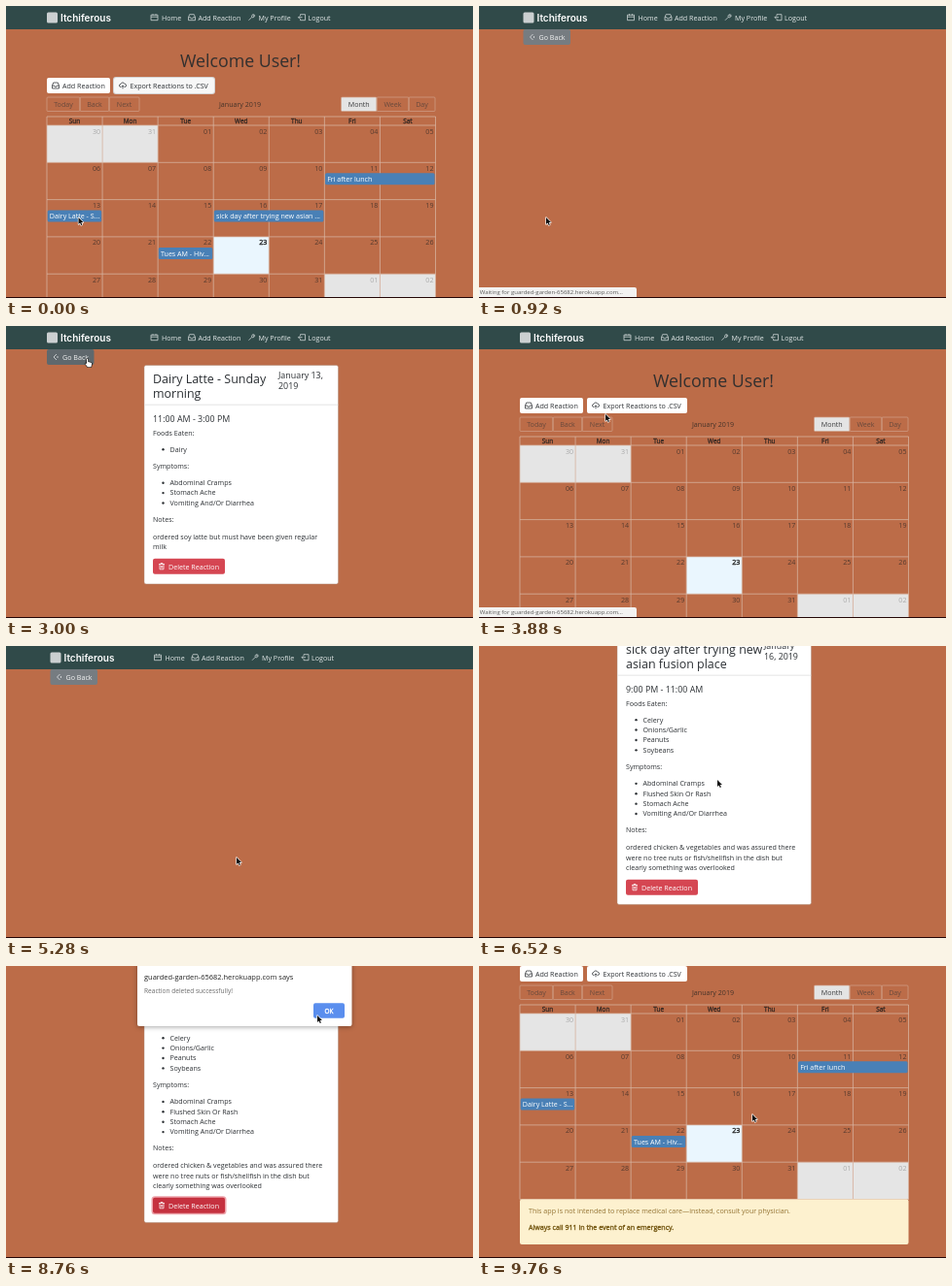
These frames come from a looping animation (480 px wide and 301 px high, 9.8 s). An HTML page with a canvas:

```html
<!DOCTYPE html>
<html lang="en">
<head>
<meta charset="utf-8">
<title>Reaction calendar</title>
<style>
html, body { margin: 0; width: 100%; height: 100%; overflow: hidden; background: #bc6c48; }
canvas { display: block; width: 480px; height: 301px; }
</style>
</head>
<body>
<canvas id="stage" width="480" height="301"></canvas>
<script>
const ctx = document.getElementById('stage').getContext('2d');
const LOOP = 9800, STEP = 40;
const BASE = 7.11, H1 = 17.77, H3 = 12.44, H5 = 8.88;
const HOST = 'guarded-garden-65682.herokuapp.com';
const PAGE = '#bc6c48', INK = '#2b2f33';

const icons = {
  calendar: 'M0 1h7v5.5h-7zM0 3h7M2 0v1.5M5 0v1.5',
  inbox: 'M0 3.5l1.2-3h4.6l1.2 3v3h-7zM0 3.5h2l.6 1.2h1.8l.6-1.2h2',
  tool: 'M.5 6.5l3.2-3.2M3.7 3.3a1.9 1.9 0 0 1 2.2-2.7l-1 1.1.5.6 1.2-1a1.9 1.9 0 0 1-2.9 2',
  logout: 'M2 2v-1.5h5v6h-5v-1.5M0 3.5h4M1.3 2.2l-1.3 1.3 1.3 1.3',
  cloud: 'M2 5h-.5a1.5 1.5 0 0 1 0-3a2 2 0 0 1 3.8-.3a1.6 1.6 0 0 1 .2 3.3h-.5M3.5 6.8v-3.3M2.4 4.5l1.1-1.1 1.1 1.1',
  back: 'M4 .5l-3 3 3 3M5.5 2.5l-1 1 1 1',
  trash: 'M0 1.2h6M1 1.2v5.3h4v-5.3M2 1.2v-1h2v1M2.3 2.7v2.5M3.7 2.7v2.5'
};
for (const name in icons) icons[name] = new Path2D(icons[name]);
const arrow = new Path2D('M0 0v7l1.6-1.4 1.1 2.4 1.2-.5-1.1-2.4h2.2z');
const hand = new Path2D('M1 0q1-.5 1.3.5v2.4l3.2.9q.8.3.6 1.2l-.6 3.2h-3.6l-2.4-3q-.3-1 .8-.7l.7.5z');

const events = [
  { row: 1, col: 5, span: 2, label: 'Fri after lunch' },
  { row: 2, col: 0, span: 1, label: 'Dairy Latte - S...' },
  { row: 2, col: 3, span: 2, label: 'sick day after trying new asian ...', removable: true },
  { row: 3, col: 2, span: 1, label: 'Tues AM - Hiv...' }
];

const latte = {
  title: ['Dairy Latte - Sunday', 'morning'],
  date: ['January 13,', '2019'], dateX: 280,
  time: '11:00 AM - 3:00 PM',
  foods: ['Dairy'],
  symptoms: ['Abdominal Cramps', 'Stomach Ache', 'Vomiting And/Or Diarrhea'],
  notes: ['ordered soy latte but must have been given regular', 'milk']
};
const fusion = {
  title: ['sick day after trying new', 'asian fusion place'],
  date: ['January', '16, 2019'], dateX: 293,
  time: '9:00 PM - 11:00 AM',
  foods: ['Celery', 'Onions/Garlic', 'Peanuts', 'Soybeans'],
  symptoms: ['Abdominal Cramps', 'Flushed Skin Or Rash', 'Stomach Ache', 'Vomiting And/Or Diarrhea'],
  notes: ['ordered chicken & vegetables and was assured there',
    'were no tree nuts or fish/shellfish in the dish but', 'clearly something was overlooked']
};

// Pointer stops: time, x, y
const pointerPath = [
  [0, 74.5, 218], [240, 74.5, 218], [600, 69, 218], [2320, 69, 218], [2800, 82, 34],
  [3480, 82, 34], [4560, 237, 218], [5720, 237, 218], [5920, 245, 138], [6800, 245, 138],
  [7200, 195, 246], [7840, 195, 246], [8240, 320, 51], [9400, 320, 51], [9720, 281, 153]
];

const within = (t, from, to) => t >= from && t < to;
const clamp = v => Math.max(0, Math.min(1, v));
const smooth = p => p * p * (3 - 2 * p);
const easeOut = p => 1 - (1 - p) ** 3;

// Text is placed by the vertical middle of its capitals.
function text(str, x, y, { size = BASE, color = INK, align = 'left', bold = false, font = '"Open Sans"', weight = 400 } = {}) {
  ctx.font = `${weight} ${size}px ${font}, sans-serif`;
  ctx.textAlign = align;
  ctx.fillStyle = ctx.strokeStyle = color;
  ctx.fillText(str, x, y + size * 0.36);
  if (bold) {
    ctx.lineWidth = 0.35;
    ctx.strokeText(str, x, y + size * 0.36);
  }
}

function box(x, y, w, h, fill, { radius = 0, stroke, line = 0.7 } = {}) {
  ctx.beginPath();
  ctx.roundRect(x, y, w, h, radius);
  if (fill) {
    ctx.fillStyle = fill;
    ctx.fill();
  }
  if (stroke) {
    ctx.strokeStyle = stroke;
    ctx.lineWidth = line;
    ctx.stroke();
  }
}

function icon(name, x, y, color) {
  ctx.save();
  ctx.translate(x, y - 3.5);
  ctx.strokeStyle = color;
  ctx.lineWidth = 0.75;
  ctx.stroke(icons[name]);
  ctx.restore();
}

function header() {
  box(-5, 0, 490, 24, '#304a49');
  box(42, 6.5, 11, 11, '#cbd0d1', { radius: 1.5 });
  text('Itchiferous', 56, 12, { size: 10, color: '#fff', font: 'Inter', weight: 600 });
  const links = [['calendar', 149, 'Home', 160], ['inbox', 187.5, 'Add Reaction', 197.5],
    ['tool', 249, 'My Profile', 259.5], ['logout', 300.5, 'Logout', 310.5]];
  for (const [name, ix, label, x] of links) {
    icon(name, ix, 11.7, '#d3dada');
    text(label, x, 12, { color: '#e3e8e8' });
  }
}

function goBack(hover) {
  box(42, 24, 48.5, 16, hover ? '#5f686d' : '#767c81', { radius: 2 });
  icon('back', 48, 32, '#e8eaec');
  text('Go Back', 58, 32.3, { color: '#f4f4f4' });
}

function toolbar() {
  const line = '#d0a18a', color = '#68493c';
  const buttons = [['Today', 42, 76], ['Back', 76, 106], ['Next', 106, 137],
    ['Month', 344.5, 381], ['Week', 381, 414], ['Day', 414, 441]];
  for (const [label, x1, x2] of buttons) {
    const active = label === 'Month';
    box(x1, 94, x2 - x1, 14.5, active ? '#e4e4e4' : null, { stroke: line, radius: 1 });
    text(label, (x1 + x2) / 2, 101.3, { align: 'center', color: active ? '#3b3d3f' : color });
  }
  text('January 2019', 240.5, 101.3, { align: 'center', color: '#453329' });
}

function calendar({ loaded, removed, focused }) {
  const left = 42, top = 123, colW = 57.07, rowH = 38.3, line = '#d9b6a3';
  text('Welcome User!', 241, 56.5, { size: H1, align: 'center', color: '#33302f' });

  box(42, 74, 65, 16, '#fff', { radius: 2 });
  icon('inbox', 47.5, 82, INK);
  text('Add Reaction', 58, 82.2);
  if (focused) box(110, 73, 105, 18, '#d5d2d2', { radius: 3 });
  box(111, 74, 103, 16, focused ? '#f7f7f7' : '#fff', { radius: 2 });
  icon('cloud', 116.5, 82, INK);
  text('Export Reactions to .CSV', 127.5, 82.2);
  toolbar();

  ['Sun', 'Mon', 'Tue', 'Wed', 'Thu', 'Fri', 'Sat'].forEach((day, col) =>
    text(day, left + (col + 0.5) * colW, 118.6, { size: 6.4, align: 'center', bold: true, color: '#3c2c25' }));

  for (let cell = 0; cell < 35; cell++) {
    const x = left + (cell % 7) * colW, y = top + Math.floor(cell / 7) * rowH;
    const outside = cell < 2 || cell > 32, today = cell === 24;
    if (outside || today) box(x, y, colW, rowH, today ? '#eaf6fe' : '#e5e5e5');
    const date = cell < 2 ? 30 + cell : (cell - 2) % 31 + 1;
    text(String(date).padStart(2, '0'), x + colW - 2, y + 6,
      { align: 'right', bold: today, color: outside ? '#aaa' : today ? '#222' : '#553a2e' });
  }

  ctx.beginPath();
  for (let row = 0; row <= 5; row++) {
    ctx.moveTo(left, top + row * rowH);
    ctx.lineTo(441.5, top + row * rowH);
  }
  for (let col = 0; col <= 7; col++) {
    ctx.moveTo(left + col * colW, 114);
    ctx.lineTo(left + col * colW, top + 5 * rowH);
  }
  ctx.moveTo(left, 114);
  ctx.lineTo(441.5, 114);
  ctx.strokeStyle = line;
  ctx.lineWidth = 0.75;
  ctx.stroke();

  if (loaded) {
    for (const { row, col, span, label, removable } of events) {
      if (removable && removed) continue;
      const x = left + col * colW, y = top + row * rowH + 11;
      box(x + 0.7, y, span * colW - 1.6, 12, '#4980b6', { radius: 1.5 });
      text(label, x + 2.8, y + 6.1, { color: '#fff' });
    }
  }

  box(42, 314.5, 399.5, 46.5, '#fdf1cf', { radius: 2 });
  text('This app is not intended to replace medical care—instead, consult your physician.', 51, 326.5, { color: '#947434' });
  text('Always call 911 in the event of an emergency.', 51, 343.5, { color: '#755813', bold: true });
}

function bullets(items, y) {
  for (const item of items) {
    ctx.beginPath();
    ctx.arc(161.5, y + 0.2, 1.2, 0, 7);
    ctx.fillStyle = INK;
    ctx.fill();
    text(item, 168.5, y);
    y += 10.4;
  }
  return y - 10.4;
}

function card(entry, { pressed, focused }) {
  const extra = entry.foods.length + entry.symptoms.length + entry.notes.length - 6;
  box(142, 40.5, 199.5, 225.5 + extra * 10.3, '#fff', { radius: 2, stroke: '#ac8673', line: 0.5 });
  box(142.3, 80.8, 199, 0.7, '#dcdcdc');
  entry.title.forEach((s, i) => text(s, 151, 54.3 + i * 14.9, { size: H3 }));
  entry.date.forEach((s, i) => text(s, entry.dateX, 51.3 + i * 10.6, { size: H5 }));
  text(entry.time, 151, 96, { size: H5 });
  text('Foods Eaten:', 151, 110);
  let y = bullets(entry.foods, 127) + 17.5;
  text('Symptoms:', 151, y);
  y = bullets(entry.symptoms, y + 17) + 17;
  text('Notes:', 151, y);
  y += 17.8;
  entry.notes.forEach((s, i) => text(s, 151, y + i * 10.4));
  y += (entry.notes.length - 1) * 10.4 + 20.3;
  if (focused) box(149.5, y - 9.5, 77, 19, '#eda3aa', { radius: 3.5 });
  box(151, y - 8, 74, 16, pressed ? '#c5313f' : '#d54652', { radius: 2 });
  icon('trash', 157, y, '#fff');
  text('Delete Reaction', 167, y + 0.2, { color: '#fff' });
}

function dialog(message, cancellable) {
  ctx.save();
  ctx.shadowColor = 'rgba(0,0,0,.35)';
  ctx.shadowBlur = 5;
  ctx.shadowOffsetY = 1;
  box(135, -4, 220.5, 66, '#fff', { radius: 2 });
  ctx.restore();
  text(HOST + ' says', 142, 11.3, { size: 7.46, color: '#222' });
  text(message, 142, 26, { size: 6.57, color: '#6a6a6a' });
  if (cancellable) {
    box(279, 38.3, 33, 15.5, '#fff', { radius: 2, stroke: '#d5d8dc' });
    text('Cancel', 295.5, 46.2, { size: 6.2, align: 'center', color: '#4f86ec' });
  }
  box(316, 38.3, 32, 15.5, '#5a8eee', { radius: 2 });
  text('OK', 332, 46.2, { size: 6.4, align: 'center', color: '#fff', bold: true });
}

function statusBar() {
  box(-2, 290, 164, 13, '#f3f2f1', { radius: 2 });
  text(`Waiting for ${HOST}...`, 0.8, 295.3, { size: 6.03, color: '#5a5a5a' });
}

function pointer(t) {
  let i = pointerPath.findIndex(stop => stop[0] > t);
  if (i < 0) i = pointerPath.length;
  const a = pointerPath[i - 1], b = pointerPath[i] || a;
  const p = b === a ? 0 : smooth((t - a[0]) / (b[0] - a[0]));
  const x = a[1] + (b[1] - a[1]) * p, y = a[2] + (b[2] - a[2]) * p;
  const pointing = within(t, 2320, 3320) && y < 40 || within(t, 7000, 7480) && y > 238;
  ctx.save();
  ctx.translate(x, y);
  ctx.lineJoin = 'round';
  ctx.lineWidth = 1.3;
  ctx.strokeStyle = pointing ? '#111' : '#fff';
  ctx.fillStyle = pointing ? '#fff' : '#111';
  ctx.stroke(pointing ? hand : arrow);
  ctx.fill(pointing ? hand : arrow);
  ctx.restore();
}

function scrollAt(t) {
  if (t < 6240) return 0;
  if (t < 9440) return 53 * easeOut(clamp((t - 6280) / 360));
  return 53 + 21 * easeOut(clamp((t - 9520) / 240));
}

function draw(t) {
  const blank = within(t, 240, 1160) || within(t, 5160, 5520);
  const onLatte = within(t, 1160, 3320), onFusion = within(t, 5520, 9440);
  ctx.fillStyle = PAGE;
  ctx.fillRect(0, 0, 480, 301);

  ctx.save();
  ctx.translate(blank ? 3.5 : 0, -scrollAt(t));
  header();
  if (blank || onLatte || onFusion) {
    goBack(within(t, 2720, 3320));
    if (onLatte) card(latte, {});
    if (onFusion) card(fusion, { pressed: t >= 7120, focused: t >= 7320 });
  } else {
    calendar({
      loaded: !within(t, 3320, 4000) && !within(t, 9440, 9600),
      removed: t >= 9440,
      focused: t < 240
    });
  }
  ctx.restore();

  if (within(t, 7480, 8400)) dialog('Are you sure you want to delete this reaction?', true);
  if (within(t, 8680, 9360)) dialog('Reaction deleted successfully!', false);
  if (within(t, 640, 1160) || within(t, 3640, 4000) || within(t, 8520, 8680)) statusBar();
  box(0, 300, 480, 1, '#240606');
  pointer(t);
}

const start = performance.now();
function tick() {
  const t = (performance.now() - start) % LOOP;
  draw(Math.floor(t / STEP) * STEP);
  requestAnimationFrame(tick);
}
tick();
</script>
</body>
</html>
```
